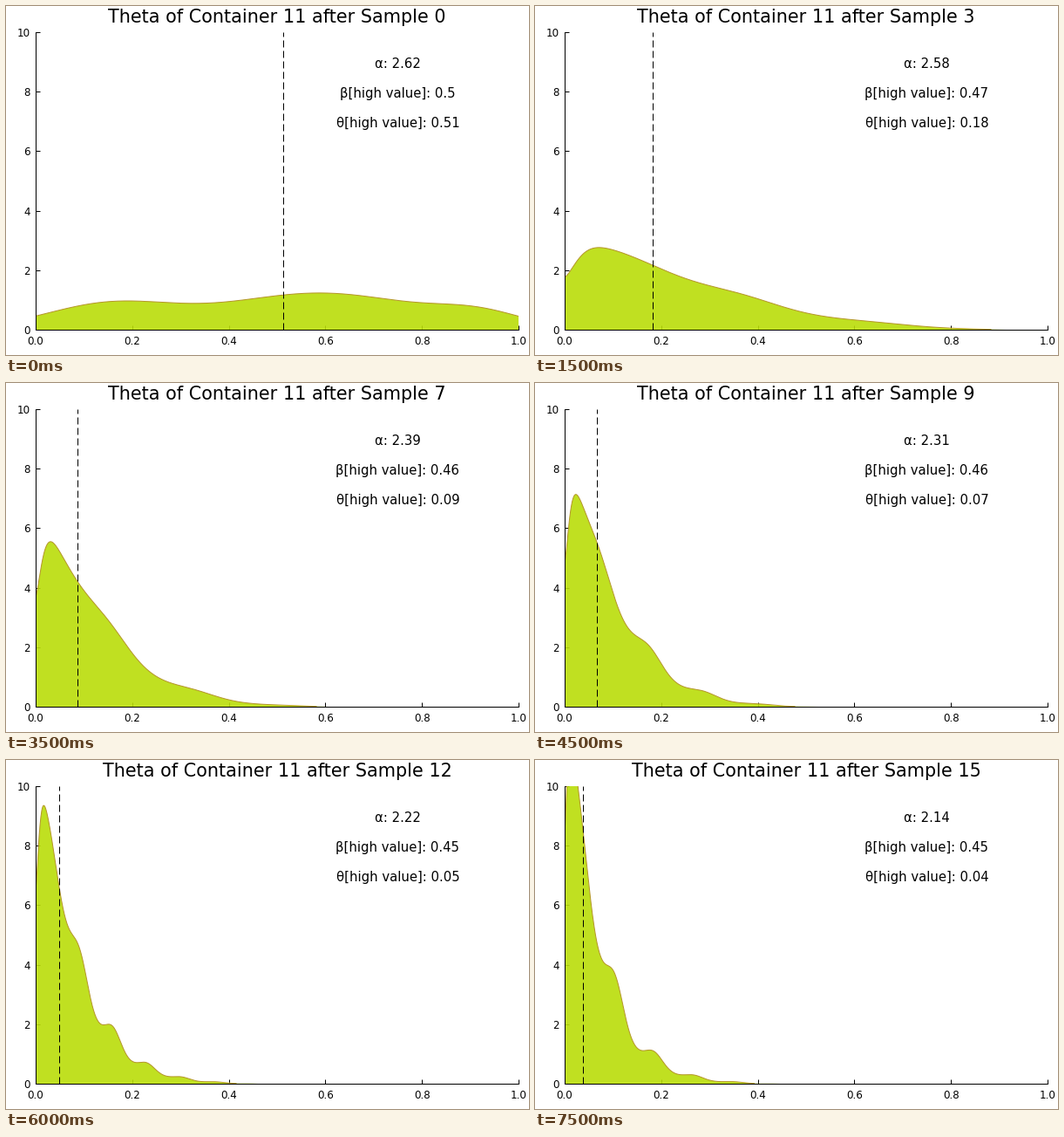
Recreate the animation shown at these times as a matplotlib script. Size 600 px wide and 400 px high, loop 8 s.

```python
import numpy as np
import matplotlib.pyplot as plt
from matplotlib.animation import FuncAnimation

W, H, DPI = 600, 400, 100
PX = 72 / DPI          # one pixel in points
FONT = 1.07            # font scale
SAMPLES = 16
FIRST = 3              # samples until the prior has faded out

plt.rcParams["font.family"] = "DejaVu Sans"

# Key points over the samples
KEYS = [0, 3, 5, 7, 10, 13, 15]
ALPHA = [2.62, 2.58, 2.37, 2.39, 2.27, 2.2, 2.14]
THETA = [.512, .1815, .1275, .087, .058, .0455, .038]
BUMP = [.38, .38, .13, .15, .195, .147, .107]   # crest of the ripple
GAP = [.3, .3, .2, .2, .075, .07, .083]         # distance between crests

x = np.linspace(0, 1, 1109)


def at(n, values):
    return float(np.interp(n, KEYS, values))


def theta(n):
    return np.exp(at(n, np.log(THETA)))


def beta(n):
    return .476 - .0018 * n + .024 * np.exp(-n)


def hump(height, center, width):
    return height * np.exp(-((x - center) / width) ** 2)


def prior():
    return hump(1.23, .59, .29) + hump(.82, .15, .19) + hump(.42, .92, .13)


def posterior(n):
    """Stretched exponential in x / theta, softened at zero, with a ripple."""
    mean = theta(n)
    s = x / mean
    decay = (.27 + .02 * n) * s ** (1.65 - .043 * n)
    ramp = 1 - .42 * np.exp(-(s / .2) ** 1.5)
    wave = np.cos(2 * np.pi * (x - at(n, BUMP)) / at(n, GAP))
    ripple = (.05 + .012 * n) * (1 - np.exp(-(s / 2) ** 2)) * wave
    y = .56 / mean * ramp * np.exp(ripple - decay) * (1 - x ** 4)
    return np.maximum(y - .02, 0)


def density(n):
    t = min(n / FIRST, 1)
    return prior() ** (1 - t) * posterior(max(n, FIRST)) ** t


fig = plt.figure(figsize=(W / DPI, H / DPI), dpi=DPI, facecolor="white")
ax = fig.add_axes([34 / W, 29 / H, 554 / W, 341 / H])
ax.set(xlim=(0, 1), ylim=(0, 10), xticks=np.arange(6) / 5, yticks=range(0, 11, 2))
ax.set_axisbelow(True)
ax.spines[["top", "right"]].set_visible(False)
ax.spines[["left", "bottom"]].set_linewidth(PX)
ax.tick_params(direction="in", length=5 * PX, width=PX, labelsize=8 * FONT)
ax.tick_params(axis="x", pad=5)
ax.tick_params(axis="y", pad=4.7)

area, = ax.fill([0, 1, 1], [0, 0, 0], color="#b9dd09", alpha=.9, lw=0, zorder=1)
edge, = ax.plot([], [], color="#b5962a", lw=PX, zorder=1.5)
line, = ax.plot([], [], color="black", lw=PX, ls=(0, (8, 4)),
                dash_capstyle="butt", zorder=3)
title = fig.text(311 / W, 1 - 19 / H, "", size=14 * FONT, ha="center")
notes = [ax.text(.75, y - .2, "", size=10 * FONT, ha="center") for y in (9, 8, 7)]


def draw(n):
    y = density(n)
    area.set_xy(np.column_stack([np.r_[x, 1, 0], np.r_[y, 0, 0]]))
    edge.set_data(x, np.where(y > .01, y, np.nan))
    line.set_data([theta(n)] * 2, [0, 10])
    title.set_text(f"Theta of Container 11 after Sample {n}")
    values = at(n, ALPHA), beta(n), theta(n)
    for note, name, v in zip(notes, ("α", "β[high value]", "θ[high value]"), values):
        note.set_text(f"{name}: {round(float(v), 2)}")
    return area, edge, line, title, *notes


anim = FuncAnimation(fig, draw, frames=SAMPLES, interval=500, repeat=True, repeat_delay=0)
plt.show()
```
